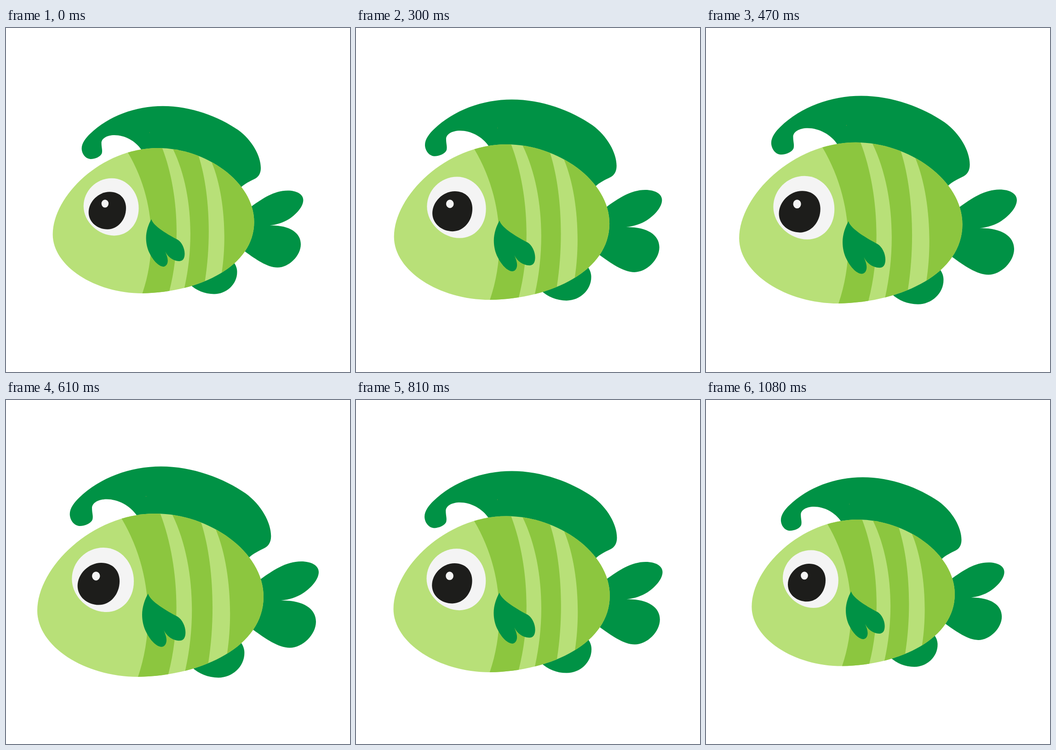
These frames come from a looping animation (748x748 px, 1110 ms). An HTML page with a canvas:

```html
<!DOCTYPE html>
<html lang="en">
<head>
<meta charset="utf-8">
<title>Fish</title>
<style>
html, body { margin: 0; width: 100%; height: 100%; overflow: hidden; background: #fff; }
canvas { display: block; width: 748px; height: 748px; }
</style>
</head>
<body>
<canvas id="stage"></canvas>
<script>
const SIZE = 748, MID = SIZE / 2;
const LOOP = 1110, STEPS = 33, PEAK = 17;
const GROW = 0.1317;                       // extra size at the peak
const BASE = 1 + GROW * 15 / 16;           // size at which the paths are drawn

const DARK = '#009245', LIGHT = '#b8e078', STRIPE = '#8cc63f';
const WHITE = '#f4f4f4', BLACK = '#1d1d1b';

const canvas = document.getElementById('stage');
const ctx = canvas.getContext('2d');
const dpr = window.devicePixelRatio || 1;
canvas.width = canvas.height = Math.round(SIZE * dpr);

const body = new Path2D(`M68 458 C68 365 186 247 325 247 C441 247 560 329 560 428
  C560 534 430 599.5 287 602 C170 602 68 535 68 458Z`);
const stripes = new Path2D(`
  M251.5 258 C318 370 322 500 287 602 L285 615 L350 615 L353 596
  C383 480 373 345 335.5 247 L330 235 L240 235Z
  M362 250 C408 345 415 475 390 587 L385 605 L434 605 L440 571
  C456 470 451 350 424.5 267 L418 240 L357 240Z
  M456 281 C487 355 494 465 481 550 L476 580 L600 580 L600 250 L443 250Z`);
const dorsal = new Path2D(`M285 252 C270 229 243 215.7 219 215.7 C200 215.7 187 224 187 235
  C187 246 190 252 188 260 C185 268 172 274 160 274 C147 273 138.7 260 138.7 248
  C138.7 235 149 222 159 212.5 C204 169 270 144.5 337 144.5 C406 144.5 473 170 521 203
  C555 228 576.3 266 576.3 296 C576.3 310 570 318 562 322 C550 328 537 334 528 343
  L400 350 L300 300Z`);
const tail = new Path2D(`M553 390 C580 371 608 351 642 351 C664 351 680 360 680 374
  C680 390 664 408 646 420 C632 429 616 434 598 436 C645 435 674 453 674 482
  C674 510 645 538.8 617 538.8 C592 538.8 563 518 538 500 L500 450Z`);
const belly = new Path2D(`M510 526 C516 534 518.4 542 518.4 550 C518.4 580 492 603.7 462 603.7
  C439 603.7 419 595 404 581 L450 540Z`);
const sideFin = new Path2D(`M309 421 C313 438 352 460 373 471 C383 477 390.3 492 390.3 505
  C390.3 517 386 523.3 377 523.3 C362 523 349 513 343 500 C346 508 349 515 349 522
  C349 531 344 536.8 338 536.8 C326 536 313 521 305 505 C299 494 296 480 296 467
  C296 450 302 433 309 421Z`);
const eye = new Path2D(`M212 321 C250 321 278 355 278 394 C278 433 252 461 218 461
  C180 461 143.3 428 143.3 389 C143.3 352 174 321 212 321Z`);
const pupil = new Path2D(`M207 354 C232 354 247 371 247 394 C247 422 227 445.6 202 445.6
  C177 445.6 155.6 428 155.6 404 C155.6 378 180 354 207 354Z`);

function ellipse(x, y, rx, ry) {
  const p = new Path2D();
  p.ellipse(x, y, rx, ry, 0, 0, Math.PI * 2);
  return p;
}
const glint = ellipse(195.7, 382.8, 8.7, 9.6);
const speck = ellipse(304.5, 209.5, 0.7, 0.7);

function fill(path, color) {
  ctx.fillStyle = color;
  ctx.fill(path);
}

// Linear swell to the peak step, then linear shrink back.
function sizeAt(ms) {
  const step = Math.min(STEPS - 1, Math.floor((ms % LOOP + 4.56) * STEPS / LOOP));
  const k = step <= PEAK ? step / PEAK : (STEPS - step) / (STEPS - PEAK);
  return 1 + GROW * k;
}

function draw(ms) {
  const s = sizeAt(ms) / BASE;
  ctx.setTransform(dpr, 0, 0, dpr, 0, 0);
  ctx.fillStyle = '#fff';
  ctx.fillRect(0, 0, SIZE, SIZE);
  ctx.translate(MID, MID);
  ctx.scale(s, s);
  ctx.translate(-MID, -MID);

  for (const fin of [dorsal, tail, belly]) fill(fin, DARK);
  fill(speck, '#6f9a45');
  fill(body, LIGHT);
  ctx.save();
  ctx.clip(body);
  fill(stripes, STRIPE);
  ctx.restore();
  fill(sideFin, DARK);
  fill(eye, WHITE);
  fill(pupil, BLACK);
  fill(glint, WHITE);
}

const start = performance.now();
function tick() {
  draw(performance.now() - start);
  requestAnimationFrame(tick);
}
tick();
</script>
</body>
</html>
```
